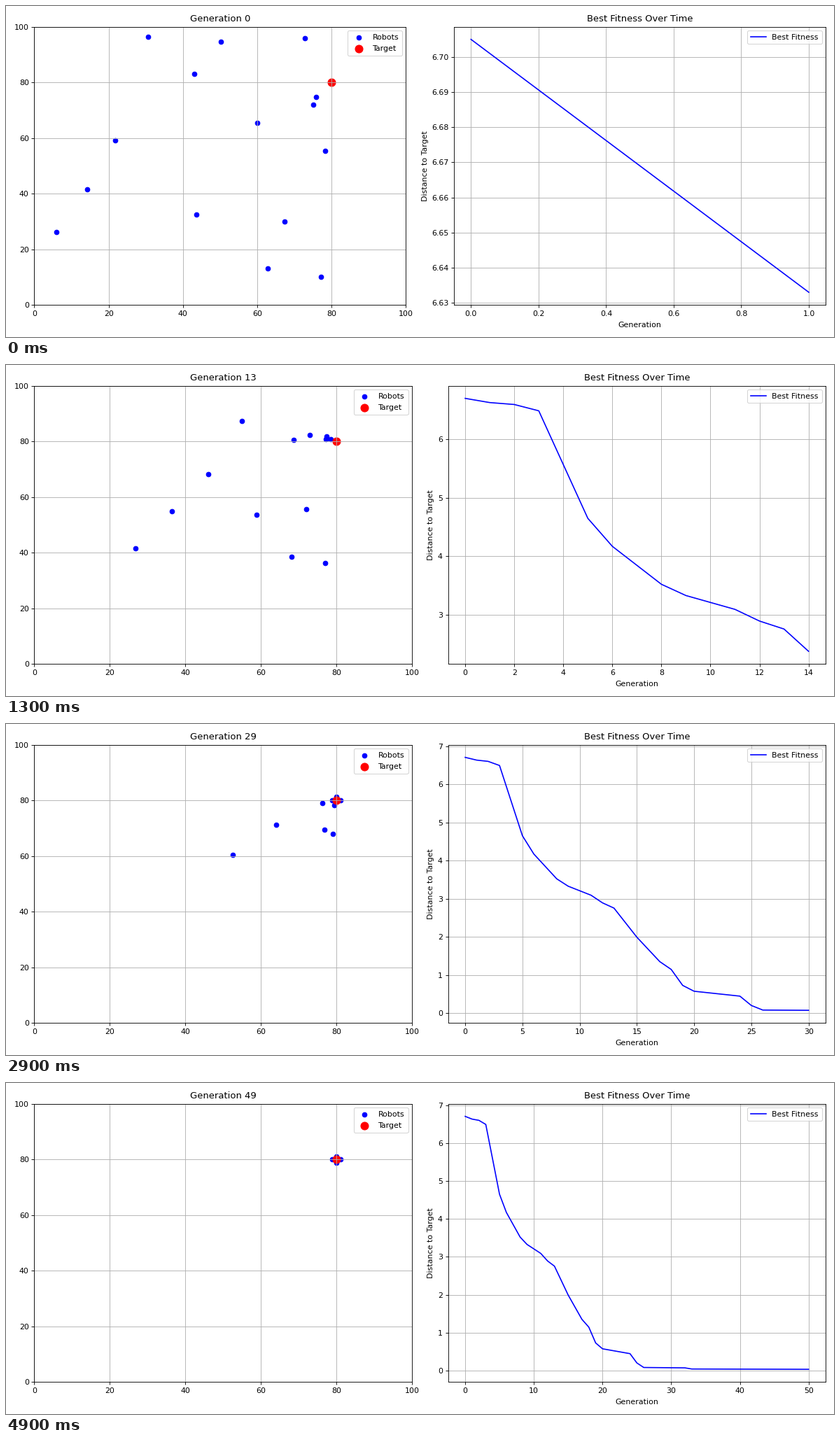
A matplotlib script for the animation above (5000 ms loop, 1183 by 473 pixels).

```python
import numpy as np
import matplotlib.pyplot as plt
from matplotlib.animation import FuncAnimation

W, H = 1183, 473
DPI = W / 15
TOP, BOTTOM = 29.6, 427.2     # plot edges in pixels from the top
FRAMES, STEP_MS = 50, 100
SPEED = 2.0
GOAL = np.array([80, 80])
TITLE_PAD = 7

starts = [
    (78.3, 55.4), (30.6, 96.3), (50.2, 94.6), (60.0, 65.5), (72.85, 96.0),
    (75.85, 74.75), (75.05, 72.05), (21.7, 59.2), (42.95, 83.1), (14.2, 41.6),
    (67.4, 30.0), (5.9, 26.1), (43.6, 32.6), (62.9, 13.15), (77.2, 10.15),
]

# Corners of the best-distance curve: generation, distance
corners = np.array([
    (0, 6.705), (1, 6.633), (2, 6.6), (3, 6.492), (5, 4.65), (6, 4.17),
    (8, 3.52), (9, 3.327), (11, 3.09), (12, 2.89), (13, 2.753), (15, 1.99),
    (17, 1.35), (18, 1.145), (19, 0.727), (20, 0.573), (24, 0.445), (25, 0.2),
    (26, 0.08), (32, 0.07), (33, 0.04), (50, 0.032),
])
generations = np.arange(FRAMES + 1)
fitness = np.interp(generations, *corners.T)


def polar(radius, angle):
    return radius * np.array([np.cos(angle), np.sin(angle)])


def leader(t):
    """The best robot circles the goal while it closes in."""
    return GOAL + polar(fitness[t], np.radians(231.7 - 5.2 * t))


def track(k, start):
    """Chase the leader at a capped speed, each robot keeping its own slot."""
    slot = polar(1.1 if k % 4 == 0 else 0.2, k * np.pi / 8)
    path = [np.array(start)]
    for t in range(1, FRAMES):
        gap = leader(t) + slot - path[-1]
        path.append(path[-1] + gap * min(1, SPEED / max(np.hypot(*gap), 1e-9)))
    return path


tracks = np.array([track(k, p) for k, p in enumerate(starts)])

fig, (field, chart) = plt.subplots(
    1, 2, dpi=DPI, figsize=((W + 0.001) / DPI, (H + 0.001) / DPI))

robots = field.scatter(*tracks[:, 0].T, color="blue", label="Robots")
field.scatter(*GOAL, color="red", s=100, label="Target")
field.set(xlim=(0, 100), ylim=(0, 100))

line, = chart.plot([], [], color="blue", label="Best Fitness")
chart.set_title("Best Fitness Over Time", pad=TITLE_PAD)
chart.set_xlabel("Generation", labelpad=5.4)
chart.set_ylabel("Distance to Target")

for ax in (field, chart):
    ax.grid(True)
    ax.legend(loc="upper right", labelspacing=0.57, borderpad=0.43)


def draw(i):
    robots.set_offsets(tracks[:, i])
    field.set_title(f"Generation {i}", pad=TITLE_PAD)
    line.set_data(generations[:i + 2], fitness[:i + 2])
    chart.relim()
    chart.autoscale_view()
    fig.tight_layout()
    fig.subplots_adjust(top=1 - TOP / H, bottom=1 - BOTTOM / H)
    return robots, line


anim = FuncAnimation(fig, draw, frames=FRAMES, interval=STEP_MS,
                     init_func=lambda: draw(0), repeat=True, repeat_delay=0)
plt.show()
```
